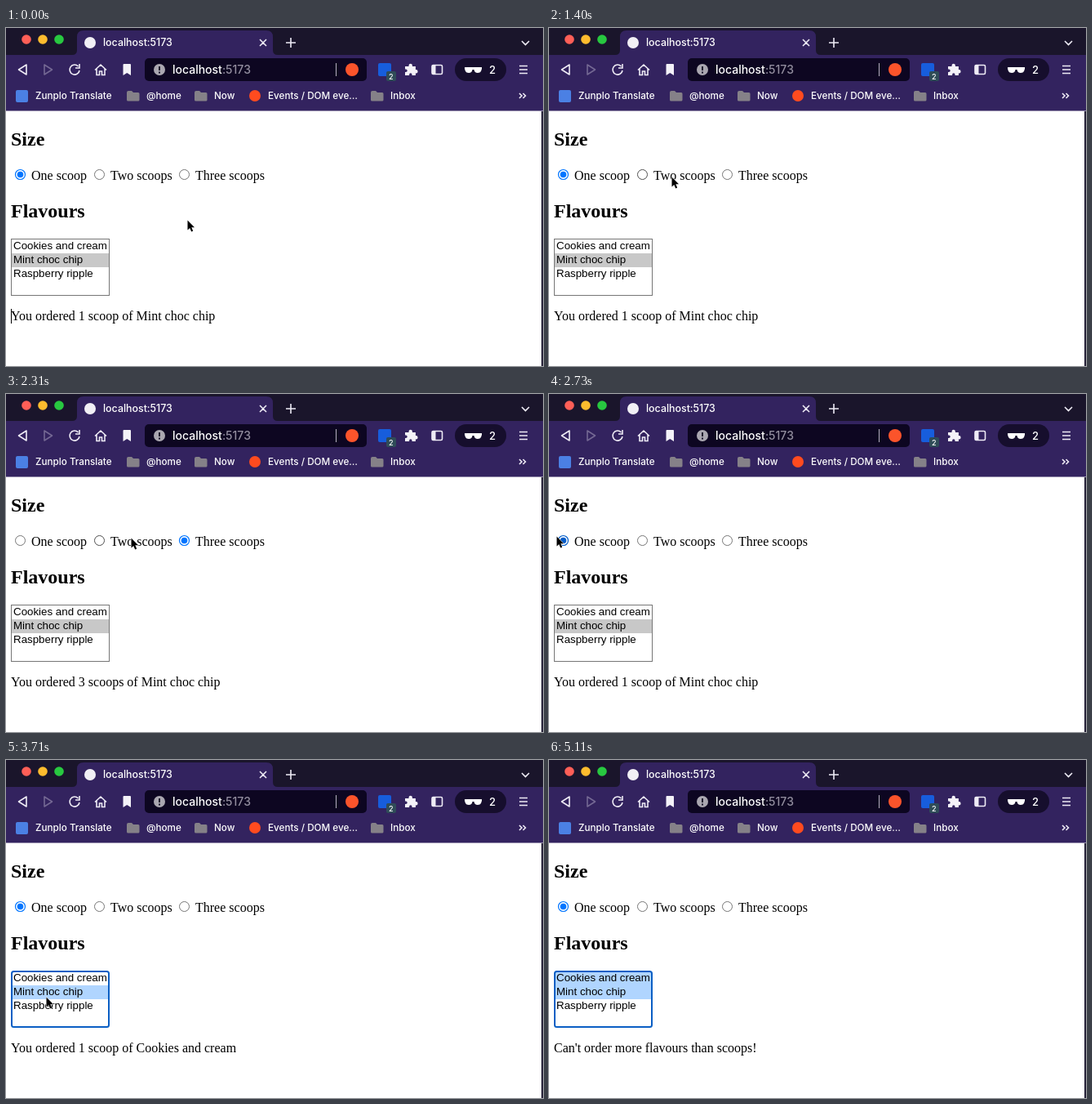
An HTML page for the animation above (5.18 s loop, 658 by 414 pixels).

```html
<!DOCTYPE html>
<html lang="en">
<head>
<meta charset="utf-8">
<title>Ice cream order form</title>
<style>
  html, body { margin: 0; width: 100%; height: 100%; overflow: hidden; background: #fff; }
  svg { display: block; width: 658px; height: 414px; }
  .ui { font-family: Inter, Roboto, sans-serif; font-weight: 500; fill: #fff; }
  .bookmark { font-size: 11.7px; }
  .page { font: 16px "Liberation Serif", Times, serif; }
  .heading { font: bold 24px "Liberation Serif", Times, serif; }
  .option { font: 13.333px "Liberation Sans", Arial, sans-serif; }
  .line { fill: none; stroke: #eeebf5; stroke-width: 1.6; }
</style>
</head>
<body>
<svg viewBox="0 0 658 414">
  <defs>
    <path id="folder" d="M0 2q0-2 2-2h4l2 2h6q1.500 0 1.500 1.500V11q0 1.500-1.500 1.500H1.500Q0 12.500 0 11z" fill="#858188"/>
  </defs>

  <!-- Window and tab strip -->
  <rect width="658" height="414" fill="#fff"/>
  <rect width="658" height="34" fill="#1a152b"/>
  <rect y="33" width="658" height="68.500" fill="#33235f"/>
  <path d="M81 33q6 0 6-6V11q0-8 8-8h224q8 0 8 8v16q0 6 6 6z" fill="#33235f"/>
  <circle cx="25" cy="14" r="5.800" fill="#ff5f57"/>
  <circle cx="45" cy="14" r="5.800" fill="#febc2e"/>
  <circle cx="65" cy="14" r="5.800" fill="#28c840"/>
  <circle cx="103" cy="18" r="7" fill="#f1eff5"/>
  <text class="ui" x="119" y="22" font-size="12.400">localhost:5173</text>
  <path class="line" d="M311 14l8 8m0-8l-8 8M343 18h12m-6-6v12M632 16l4.500 4.500 4.500-4.500"/>

  <!-- Toolbar -->
  <path class="line" d="M25 45v12l-9.500-6z" stroke-linejoin="round"/>
  <path class="line" d="M47 45v12l9.500-6z" stroke-linejoin="round" opacity=".35"/>
  <path class="line" d="M88.500 47a6 6 0 1 0 1.500 5M90 44v5h-5"/>
  <path class="line" d="M109 51.500l7-6.500 7 6.500M111 50v7.500h3.500v-4.500h3v4.500h3.500V50"/>
  <path d="M143.500 45q0-1 1-1h7.500q1 0 1 1v13l-4.750-3-4.750 3z" fill="#f4f2f8"/>
  <rect x="170" y="37" width="272" height="28" rx="5" fill="#0d0621"/>
  <circle cx="188" cy="51" r="7" fill="#aaa7b0"/>
  <path d="M188 47v5m0 1.500v2" stroke="#0d0621" stroke-width="1.800"/>
  <text class="ui" x="204" y="56" font-size="14" font-weight="400">localhost<tspan fill="#938e9f">:5173</tspan></text>
  <path d="M404.500 43v16" stroke="#b5b1bf"/>
  <circle cx="424" cy="51" r="8" fill="#fb542b"/>
  <rect x="456" y="43" width="16" height="16" rx="2" fill="#175ddc"/>
  <rect x="466" y="53" width="12" height="12" rx="2" fill="#2f4c58"/>
  <text class="ui" x="469" y="62.500" font-size="9">2</text>
  <path d="M489 47h4.500v-1a2.200 2.200 0 0 1 4.400 0v1h4v4h.5a2.200 2.200 0 0 1 0 4.400h-.5V58h-4.400v-1a1.700 1.700 0 0 0-3.400 0v1H489v-4h1a1.700 1.700 0 0 0 0-3.400h-1z" fill="#f4f2f8"/>
  <rect class="line" x="522" y="45.500" width="12.500" height="11" rx="1.500"/>
  <path d="M522 46h4.500v10H522z" fill="#eeebf5"/>
  <rect x="550" y="37" width="63" height="28" rx="14" fill="#160e2d"/>
  <path d="M562 48h21v2l-1 3q-1 2-4 2-4 0-4.500-4h-2q-.5 4-4.500 4-3 0-4-2l-1-3z" fill="#fff"/>
  <text class="ui" x="592" y="56" font-size="13">2</text>
  <path class="line" d="M629 46.500h10m-10 4.500h10m-10 4.500h10"/>

  <!-- Bookmarks -->
  <rect x="12" y="76" width="15" height="15" rx="2" fill="#4b80e4"/>
  <use href="#folder" x="148" y="77"/>
  <use href="#folder" x="231" y="77"/>
  <circle cx="305" cy="83" r="7" fill="#ff4b1f"/>
  <use href="#folder" x="447" y="77"/>
  <g class="ui bookmark">
    <text x="36" y="87">Zunplo Translate</text>
    <text x="172" y="87">@home</text>
    <text x="255" y="87">Now</text>
    <text x="321" y="87">Events / DOM eve…</text>
    <text x="471" y="87">Inbox</text>
  </g>
  <path class="line" d="M629 80l3 3-3 3m4.500-6l3 3-3 3" stroke-width="1.300"/>

  <!-- Form -->
  <text class="heading" x="6" y="144">Size</text>
  <g id="radios"></g>
  <text class="heading" x="6" y="232">Flavours</text>
  <g id="options"></g>
  <rect id="listBox" fill="none"/>
  <text class="page" id="result" x="6" y="358"></text>
  <path id="caret" d="M6.500 344v18" stroke="#000"/>

  <rect x="656" y="102" width="2" height="312" fill="#28243a"/>
  <path id="pointer" d="M.5 .5V12.500L3.200 10 5.200 14.500 7.200 13.600 5.300 9.300H9Z" fill="#000" stroke="#fff" stroke-width="1" paint-order="stroke" stroke-linejoin="round"/>
</svg>
<script>
const LOOP = 5180, STEP = 70;
const FLAVOURS = ["Cookies and cream", "Mint choc chip", "Raspberry ripple"];
const SIZES = [
  { x: 17.5, end: 99, label: "One scoop" },
  { x: 114.5, end: 203, label: "Two scoops" },
  { x: 218.5, end: 317, label: "Three scoops" }
];

// time, x, y
const PATH = [
  [0, 222, 235], [350, 222, 235], [1190, 150, 182], [1540, 150, 182],
  [1890, 248, 177], [2100, 246, 177], [2590, 9, 174], [2800, 9, 174],
  [3220, 50, 264], [3430, 50, 264], [3640, 49, 290], [3920, 49, 290],
  [4270, 53, 260], [4550, 53, 260], [5040, 95, 63]
];

const mint = [1], cookies = [0], both = [0, 1];
const STATES = [
  { at: 0, scoops: 1, picked: mint, ordered: mint },
  { at: 1540, scoops: 2, picked: mint, ordered: mint },
  { at: 2030, scoops: 3, picked: mint, ordered: mint },
  { at: 2660, scoops: 1, picked: mint, ordered: mint },
  { at: 3290, scoops: 1, picked: cookies, ordered: mint, focus: true },
  { at: 3360, scoops: 1, picked: cookies, ordered: cookies, focus: true },
  { at: 3640, scoops: 1, picked: mint, ordered: cookies, focus: true },
  { at: 3780, scoops: 1, picked: mint, ordered: mint, focus: true },
  { at: 4340, scoops: 1, picked: both, ordered: both, focus: true }
];

const byId = id => document.getElementById(id);
const set = (el, attrs) => {
  for (const name in attrs) el.setAttribute(name, attrs[name]);
  return el;
};
const add = (parent, tag, attrs, text = "") => {
  const el = set(document.createElementNS(parent.namespaceURI, tag), attrs);
  el.textContent = text;
  return parent.appendChild(el);
};

const radios = SIZES.map(({ x, label }) => {
  const group = byId("radios");
  add(group, "text", { class: "page", x: x + 13.5, y: 186 }, label);
  return {
    ring: add(group, "circle", { cx: x, cy: 179.5, r: 6, fill: "#fff" }),
    dot: add(group, "circle", { cx: x, cy: 179.5, r: 3.8 })
  };
});

const rows = FLAVOURS.map((name, i) => {
  const row = add(byId("options"), "rect", { x: 7, y: 259 + 17 * i, width: 119, height: 17 });
  add(byId("options"), "text", { class: "option", x: 9, y: 271 + 17 * i }, name);
  return row;
});

function pointerAt(t) {
  const next = PATH.findIndex(key => key[0] > t);
  if (next < 0) return PATH[PATH.length - 1].slice(1);
  const [t0, x0, y0] = PATH[next - 1], [t1, x1, y1] = PATH[next];
  const p = (t - t0) / (t1 - t0), ease = p * p * (3 - 2 * p);
  return [x0 + (x1 - x0) * ease, y0 + (y1 - y0) * ease];
}

function message({ scoops, ordered }) {
  if (ordered.length > scoops) return "Can't order more flavours than scoops!";
  const unit = scoops === 1 ? "scoop" : "scoops";
  return `You ordered ${scoops} ${unit} of ${FLAVOURS[ordered[0]]}`;
}

function draw(t) {
  const state = STATES.filter(s => s.at <= t).pop();
  const [px, py] = pointerAt(t);

  radios.forEach(({ ring, dot }, i) => {
    const { x, end } = SIZES[i];
    const hover = py > 171 && py < 190 && px >= x - 9 && px <= end;
    const checked = state.scoops === i + 1;
    const color = checked ? (hover ? "#005cc8" : "#0075ff") : (hover ? "#4f4f4f" : "#767676");
    set(ring, { stroke: color, "stroke-width": checked ? 1.2 : 1 });
    set(dot, { fill: checked ? color : "none" });
  });

  rows.forEach((row, i) => set(row, {
    fill: !state.picked.includes(i) ? "none" : state.focus ? "#b0d5ff" : "#c8c8c8"
  }));
  set(byId("listBox"), state.focus
    ? { x: 7, y: 259, width: 119, height: 68, rx: 2.5, stroke: "#0b5fc4", "stroke-width": 2 }
    : { x: 6.5, y: 258.5, width: 120, height: 69, rx: 0, stroke: "#767676", "stroke-width": 1 });

  byId("result").textContent = message(state);
  const caretOn = t < 1400 && (t + 150) % 1000 < 500;
  set(byId("caret"), { visibility: caretOn ? "visible" : "hidden" });
  set(byId("pointer"), {
    transform: `translate(${Math.round(px)} ${Math.round(py)})`,
    visibility: t < 5110 ? "visible" : "hidden"
  });
}

const start = performance.now();
function tick() {
  const t = (performance.now() - start) % LOOP;
  draw(Math.floor(t / STEP) * STEP);
  requestAnimationFrame(tick);
}
tick();
</script>
</body>
</html>
```
